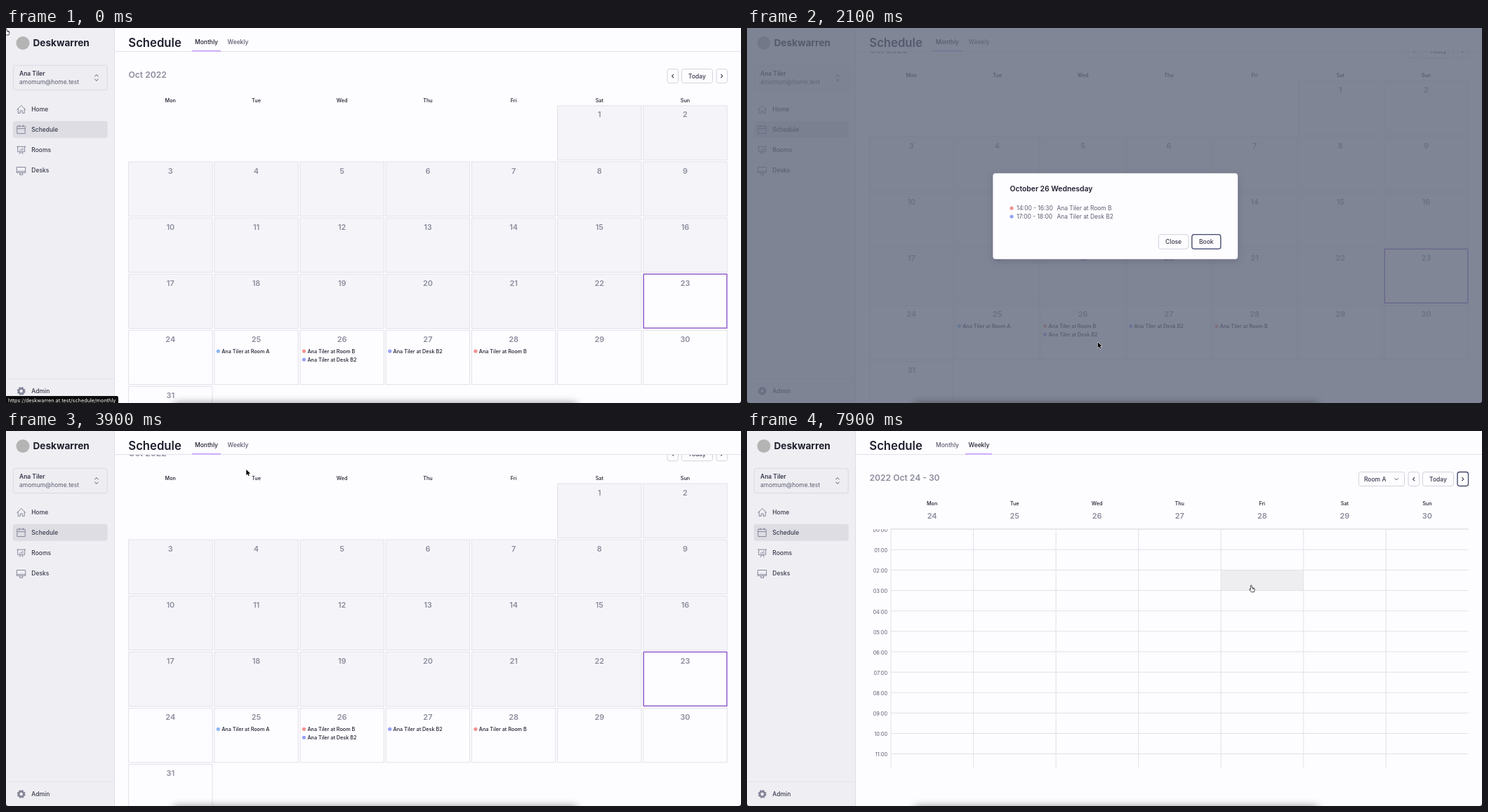
An HTML page for the animation above (8000 ms loop, 1047 by 535 pixels).

```html
<!DOCTYPE html>
<html lang="en">
<head>
<meta charset="utf-8">
<title>Desk schedule</title>
<style>
  html, body { margin: 0; width: 100%; height: 100%; overflow: hidden; background: #fdfcff; }
  svg { display: block; width: 1047px; height: 535px; font-family: Inter, Roboto, sans-serif; }
  text { white-space: pre; }
  #modal { transform-origin: 524.7px 268.5px; }
  #panel { filter: drop-shadow(0 3px 5px rgba(30, 30, 60, .18)); }
  #dock { filter: blur(6px); }
  #arrow { paint-order: stroke; }
</style>
</head>
<body>
<svg id="stage" viewBox="0 0 1047 535"></svg>
<script>
const LOOP = 8000, TICK = 100;
const PERSON = 'Ana Tiler';
const PAPER = '#fdfcff', PAST = '#f5f5f9', LINE = '#e1e1e8', EDGE = '#d3d3de', ICON = '#85869a';
const INK = '#1e1f2e', BODY = '#38394c', SOFT = '#5b5c6e', MUTED = '#8c8d9d', FOCUS = '#414a6c';
const COLORS = { 'Room A': '#8db6f3', 'Room B': '#f19292', 'Desk B2': '#96a2f6' };
const EVENTS = { 25: ['Room A'], 26: ['Room B', 'Desk B2'], 27: ['Desk B2'], 28: ['Room B'] };
const DAYS = ['Mon', 'Tue', 'Wed', 'Thu', 'Fri', 'Sat', 'Sun'];
const ROW = 29.13, COL = 117.55;

// Drawing helpers; text is placed by the middle of its capital letters.
const range = (n, make) => Array.from({ length: n }, (_, i) => make(i)).join('');
const text = (x, y, str, size = 8.47, weight = 500, fill = BODY, anchor = 'start') =>
  `<text x="${x}" y="${y + size * 0.364}" font-size="${size}" font-weight="${weight}" fill="${fill}" text-anchor="${anchor}">${str}</text>`;
const centered = (x, y, str, size, weight, fill) => text(x, y, str, size, weight, fill, 'middle');
const rect = (x, y, w, h, fill, stroke = 'none', r = 0, sw = 1) =>
  `<rect x="${x}" y="${y}" width="${w}" height="${h}" rx="${r}" fill="${fill}" stroke="${stroke}" stroke-width="${sw}"/>`;
const dot = (x, y, r, fill) => `<circle cx="${x}" cy="${y}" r="${r}" fill="${fill}"/>`;
const path = (d, stroke, sw = 1, fill = 'none') =>
  `<path d="${d}" fill="${fill}" stroke="${stroke}" stroke-width="${sw}" stroke-linecap="round" stroke-linejoin="round"/>`;
const group = (id, ...parts) => `<g id="${id}">${parts.join('')}</g>`;
const button = (x, y, w, h, label = '') =>
  rect(x, y, w, h, PAPER, EDGE, 3.2) + centered(x + w / 2, y + h / 2, label);
const focusRing = (id, x, y, w, h) => group(id, rect(x, y, w, h, 'none', FOCUS, 3.2, 1.3));
const weekdays = (x, step) => DAYS.map((d, i) => centered(x + step * i, 103, d, 7.26, 500, INK)).join('');

function pager() {
  return button(942, 58.5, 15.5, 20) + button(962.5, 58.5, 44, 20, 'Today') + button(1012, 58.5, 15.5, 20)
    + path('M950.8 66.3l-2.2 2.3 2.2 2.3M1018.6 66.3l2.2 2.3-2.2 2.3', BODY, 1.1);
}

function sidebar() {
  // Icons are drawn around (0, 0).
  const items = {
    Home: 'M-6 .5l6-6 6 6M-4.5-1v6.5h3V2h3v3.5h3V-1',
    Schedule: 'M-5.5-5h11V5.5h-11zM-5.5-1.5h11M-2.7-6.5v2.5M2.7-6.5v2.5',
    Rooms: 'M-6-5H6M-5-5v7.5H5V-5M-2.2 5.5l1.2-3M2.2 5.5L1 2.5M-2.2-.2v.8M0-1.5v2.1M2.2-2.7v3.3',
    Desks: 'M-6-4.8H6v8H-6zM-6 1.3H6M-1.4 3.2l-.8 2.9h4.4l-.8-2.9',
  };
  const item = ([name, icon], i) => `<g transform="translate(0 ${116 + 29.1 * i})">`
    + text(36.3, 0, name) + `<g transform="translate(21.7)">${path(icon, ICON)}</g></g>`;
  return rect(0, 0, 154.5, 535, '#efeff3') + path('M154.5 0V535', '#dddde5')
    + dot(24, 21.5, 9.5, '#b4b4b4') + text(38.5, 21.5, 'Deskwarren', 13.6, 700, INK)
    + rect(10.2, 53.2, 134, 35.5, '#ededf2', '#d8d8e1', 3.5)
    + text(19, 65, PERSON, 8.47, 600) + text(19, 77, 'amomum@home.test', 8.47, 400, SOFT)
    + path('M126.7 69l2.2-2.4 2.2 2.4M126.7 73l2.2 2.4 2.2-2.4', SOFT)
    + rect(9.7, 132.8, 135, 24, '#dddde3', 'none', 3.5)
    + Object.entries(items).map(item).join('')
    + path('M3 500.5H154', LINE) + text(36.3, 518, 'Admin')
    + '<g fill="none" stroke="#85869a"><circle cx="21.7" cy="518" r="3.6" stroke-width="2.8"/>'
    + '<circle cx="21.7" cy="518" r="5.2" stroke-width="1.6" stroke-dasharray="2.4 1.68"/></g>';
}

function month() {
  const cell = i => {
    const day = i + 1, slot = i + 5;
    const x = 174.6 + 122.2 * (slot % 7), y = 110.8 + 80.1 * Math.floor(slot / 7);
    const box = day === 23
      ? rect(x + 0.5, y, 118.6, 77, PAPER, '#8b55c8', 0, 1.4)
      : rect(x, y, 119.4, 77.4, day < 23 ? PAST : PAPER, LINE);
    const list = (EVENTS[day] || []).map((place, n) =>
      dot(x + 5.5, y + 29.9 + 12 * n, 2.6, COLORS[place])
      + text(x + 10.4, y + 29.9 + 12 * n, `${PERSON} at ${place}`, 7.26, 500, INK));
    return box + centered(x + 59.7, y + 12.7, day, 10.9, 600, MUTED) + list.join('');
  };
  return text(174.5, 67, 'Oct 2022', 12.1, 600, MUTED) + pager() + weekdays(234.3, 122.2) + range(31, cell);
}

function weekHead(first, current) {
  const number = i => centered(263.6 + COL * i, 121.4, first + i, 10.9, 600, current && i === 6 ? '#fff' : MUTED);
  return text(174.5, 67, `2022 Oct ${first} - ${first + 6}`, 12.1, 600, MUTED)
    + (current ? rect(205, 140, COL * 6, 339.5, PAST) + dot(968.7, 121.4, 8.6, '#9333ea') : '')
    + range(7, number);
}

function weekGrid() {
  const hour = h => path(`M205 ${140.2 + ROW * h}H1027.5`, LINE)
    + text(200, 141.4 + ROW * h, String(h).padStart(2, '0') + ':00', 7.26, 400, SOFT, 'end');
  return button(871.5, 58.5, 65, 20) + text(879, 68.5, 'Room A') + path('M922.8 67.6l2.4 2.4 2.4-2.4', SOFT)
    + pager() + weekdays(263.6, COL)
    + path('M205 139.7H1027.5', LINE)
    + range(7, i => path(`M${205 + COL * i} 140V479.5`, LINE))
    + `<g clip-path="url(#gridClip)">${group('hours', range(24, hour))}</g>`
    + group('thumb', rect(1022, 141, 4.4, 162, '#6f6f73', 'none', 2.2));
}

function tabs(active) {
  const tone = name => name === active ? INK : SOFT;
  const [x, w] = active === 'Monthly' ? [265, 41] : [311, 38];
  return text(269, 20, 'Monthly', 8.47, 500, tone('Monthly')) + text(315.6, 20, 'Weekly', 8.47, 500, tone('Weekly'))
    + rect(x, 31.8, w, 1.8, '#cba8fb');
}

function modal() {
  const row = (y, time, place) => dot(377, y, 2.6, COLORS[place])
    + text(384, y, time, 8.4, 400, SOFT) + text(441.5, y, `${PERSON} at ${place}`, 8.4, 400, SOFT);
  return group('panel', rect(350.3, 207.3, 348.8, 122.4, PAPER, 'none', 4))
    + group('content',
      text(374.5, 229, 'October 26 Wednesday', 10.35, 600, INK),
      row(257, '14:00 - 16:30', 'Room B'), row(269, '17:00 - 18:00', 'Desk B2'),
      button(586.3, 294.7, 42.5, 20.5, 'Close'), button(633.8, 294.7, 41, 20.5, 'Book'),
      focusRing('bookFocus', 633.8, 294.7, 41, 20.5),
      focusRing('closeFocus', 586.3, 294.7, 42.5, 20.5));
}

const stage = document.getElementById('stage');
stage.innerHTML =
  '<defs><clipPath id="gridClip"><rect x="155" y="140" width="880" height="339.5"/></clipPath></defs>'
  + rect(0, 0, 1047, 535, PAPER)
  + group('month', month())
  + group('week',
      group('weekNow', weekHead(17, true)),
      group('weekNext', weekHead(24, false)),
      group('hover', rect(205 + COL * 4, 140.2 + ROW * 2, COL, ROW, '#eeeef1')),
      weekGrid(),
      focusRing('nextFocus', 1012, 58.5, 15.5, 20))
  + rect(155, 0, 892, 33.5, PAPER) + path('M155 33.5H1047', LINE)
  + text(174.3, 20.5, 'Schedule', 16.7, 600, INK)
  + group('tabMonth', tabs('Monthly')) + group('tabWeek', tabs('Weekly'))
  + sidebar()
  + group('shade', rect(0, 0, 1047, 535, 'rgb(98,106,124)'))
  + group('modal', modal())
  + '<rect id="dock" x="238" y="535" width="576" height="14" rx="5" opacity=".4"/>'
  + group('status', path('M0 525H157.5q2.5 0 2.5 2.5V535H0z', 'none', 0, '#0b0b0d'),
      text(3, 531, 'https://deskwarren.at.test/schedule/monthly', 7.3, 400, '#fff'))
  + path('M0 531.5Q0 535 3.5 535H0zM1047 531.5Q1047 535 1043.5 535H1047z', 'none', 0, '#111')
  + group('cursor',
      group('arrow', path('M0 0V7.9L1.9 6.2 3.1 9 4.4 8.4 3.2 5.8H5.7Z', '#fff', 0.9, '#000')),
      group('hand', path('M-.9 5.2V1.2a.9.9 0 0 1 1.8 0V3.9l3.1.7q1 .3.9 1.4L4.4 8.5 4 10H.1L-2.6 6.7q-.4-.9.5-1 .6 0 1.2.8ZM2.1 4.4v1.1M3.4 4.7v1.1', '#222', 0.8, '#fff')));

const node = Object.fromEntries([...stage.querySelectorAll('[id]')].map(el => [el.id, el]));
const show = (id, on) => { node[id].style.visibility = on ? 'inherit' : 'hidden'; };
const move = (id, x, y) => { node[id].style.transform = `translate(${x}px, ${y}px)`; };
const fade = (id, opacity) => { node[id].style.opacity = opacity; };
const ease = (t, from, to) => {
  const u = Math.min(1, Math.max(0, (t - from) / (to - from)));
  return u * u * (3 - 2 * u);
};

// Pointer trips: leave and arrive times, the place reached, and whether it is clickable.
const HOME = { leave: 0, arrive: 0, x: 82, y: 141, link: true };
const TRIPS = [
  HOME,
  { leave: 300, arrive: 1500, x: 499.7, y: 448.3 },
  { leave: 2200, arrive: 2800, x: 620, y: 304.7, link: true },
  { leave: 3200, arrive: 3900, x: 342.3, y: 55 },
  { leave: 3900, arrive: 4200, x: 331, y: 17, link: true },
  { leave: 4600, arrive: 5200, x: 516.8, y: 230.5 },
  { leave: 6500, arrive: 7200, x: 1019, y: 68, link: true },
  { leave: 7600, arrive: 7900, x: 718.3, y: 219.7, link: true },
];

function movePointer(t) {
  let { x, y } = HOME, link = true;
  for (const trip of TRIPS.filter(trip => t >= trip.leave)) {
    const u = ease(t, trip.leave, trip.arrive);
    x += (trip.x - x) * u;
    y += (trip.y - y) * u;
    if (u > 0) link = u === 1 && trip.link;
  }
  move('cursor', x, y);
  show('hand', link);
  show('arrow', !link);
}

function render(t) {
  movePointer(t);
  show('status', t < 700);
  move('month', 0, -35.8 * ease(t, 800, 1200));

  const open = ease(t, 1700, 2100) - ease(t, 2900, 3200);
  fade('shade', 0.8 * open);
  fade('modal', open ** 1.25);
  fade('content', open ** 0.5);
  node.modal.style.scale = 0.95 + 0.05 * open;
  show('bookFocus', t < 2900);
  show('closeFocus', t >= 2900);

  const weekly = t >= 4500, next = t >= 7700;
  for (const id of ['month', 'tabMonth']) show(id, !weekly);
  for (const id of ['week', 'tabWeek']) show(id, weekly);
  const scroll = 181 * (ease(t, 5400, 5700) - ease(t, 5900, 6400));
  move('hours', 0, -scroll);
  move('thumb', 0, scroll * 0.485);
  show('thumb', t >= 5500 && t < 6900);
  show('weekNow', weekly && !next);
  show('weekNext', next);
  show('nextFocus', t >= 7300);
  show('hover', t >= 7900);
}

const start = performance.now();
function tick() {
  const t = (performance.now() - start) % LOOP;
  render(Math.floor(t / TICK) * TICK);
  requestAnimationFrame(tick);
}
tick();
</script>
</body>
</html>
```
